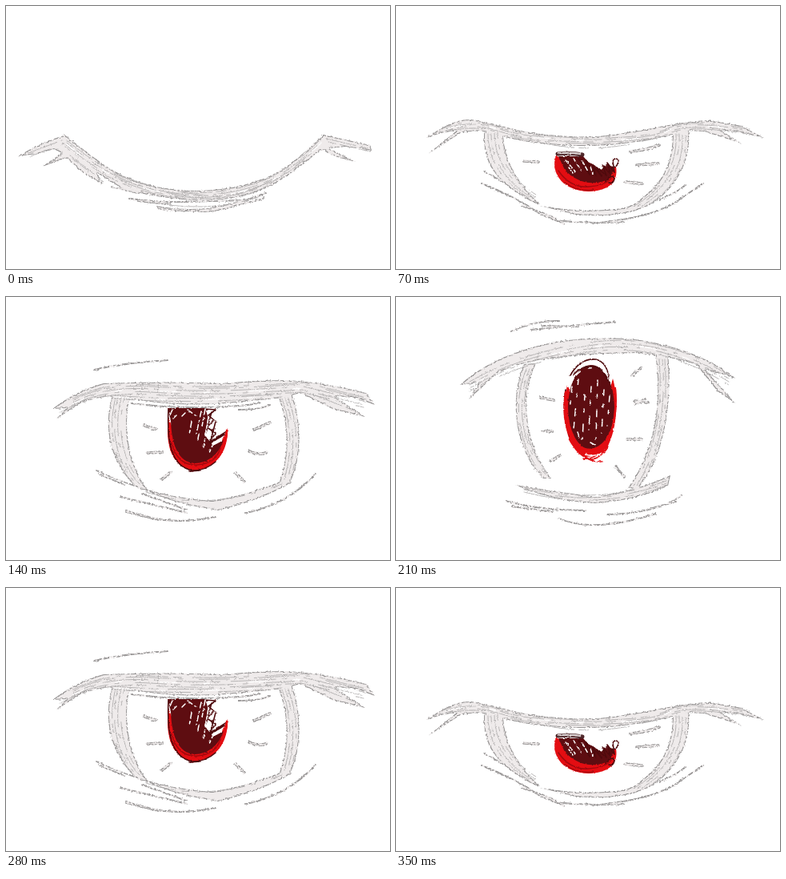
Recreate the animation shown at these times as an HTML page without scripts. Size 480 px wide and 329 px high, loop 0.42 s.

```html
<!DOCTYPE html>
<html lang="en">
<head>
<meta charset="utf-8">
<title>Blinking eye</title>
<style>
html, body { margin: 0; width: 100%; height: 100%; overflow: hidden; background: #fff; }
svg { display: block; width: 480px; height: 329px; }
path, ellipse { stroke-linecap: round; stroke-linejoin: round; }

.pose { visibility: hidden; animation: 420ms step-end infinite; }
.shut { animation-name: shut; }
.low { animation-name: low; }
.half { animation-name: half; }
.wide { animation-name: wide; }
@keyframes shut { 0% { visibility: visible } 16.66%, 100% { visibility: hidden } }
@keyframes low { 0%, 33.33% { visibility: hidden } 16.66%, 83.33%, 100% { visibility: visible } }
@keyframes half { 0%, 50%, 83.33%, 100% { visibility: hidden } 33.33%, 66.66% { visibility: visible } }
@keyframes wide { 0%, 66.66%, 100% { visibility: hidden } 50% { visibility: visible } }

/* pencil bands, thin strokes, streaks */
.band { fill: #efebeb; filter: url(#pencil); }
.band .line { fill: none; stroke: #efebeb; stroke-width: 1.9; }
.band .mark { fill: none; stroke: #efebeb; stroke-width: 3.6; }
.streak { fill: none; stroke: #b1afaf; stroke-width: .9; stroke-dasharray: 38 6 11 14 56 9 5 21; filter: url(#rough); }
.b { stroke-dashoffset: 29; }
.c { stroke-dashoffset: 77; }
.d { stroke-dashoffset: 118; }
.w { stroke: #fff; stroke-width: 1.2; stroke-dasharray: 21 34 9 47; }

/* iris */
.iris { filter: url(#wobble); fill: none; }
.dark { fill: #5e0d11; }
.ink { stroke: #4e090c; stroke-width: 1.6; }
.red { fill: #e30d12; }
.rim { stroke: #e30d12; stroke-width: 2.5; }
.deep { stroke: #a3080d; stroke-width: 1.5; }
.gap { stroke: #fff; stroke-width: 1.5; }
</style>
</head>
<body>
<svg viewBox="0 0 480 329">
<defs>
  <filter id="pencil" filterUnits="userSpaceOnUse" x="0" y="0" width="480" height="329" color-interpolation-filters="sRGB">
    <feTurbulence type="fractalNoise" baseFrequency=".35" numOctaves="2" seed="4" result="noise"/>
    <feDisplacementMap in="SourceGraphic" in2="noise" scale="3" xChannelSelector="R" yChannelSelector="G" result="body"/>
    <feMorphology in="body" operator="erode" radius="1" result="core"/>
    <feComposite in="body" in2="core" operator="out" result="edge"/>
    <feFlood flood-color="#999797"/>
    <feComposite in2="edge" operator="in" result="outline"/>
    <feColorMatrix in="noise" values="0 0 0 0 0  0 0 0 0 0  0 0 0 0 0  0 0 8 0 -3"/>
    <feComposite in="outline" operator="in" in2="grain" result="unused"/>
    <feColorMatrix in="noise" values="0 0 0 0 0  0 0 0 0 0  0 0 0 0 0  0 0 8 0 -3" result="grain"/>
    <feComposite in="outline" in2="grain" operator="in" result="broken"/>
    <feMerge><feMergeNode in="body"/><feMergeNode in="broken"/></feMerge>
  </filter>
  <filter id="rough" filterUnits="userSpaceOnUse" x="0" y="0" width="480" height="329" color-interpolation-filters="sRGB">
    <feTurbulence type="fractalNoise" baseFrequency=".4" numOctaves="2" seed="9"/>
    <feDisplacementMap in="SourceGraphic" scale="3" xChannelSelector="R" yChannelSelector="G"/>
  </filter>
  <filter id="wobble" filterUnits="userSpaceOnUse" x="0" y="0" width="480" height="329" color-interpolation-filters="sRGB">
    <feTurbulence type="fractalNoise" baseFrequency=".3" numOctaves="2" seed="2"/>
    <feDisplacementMap in="SourceGraphic" scale="2.5" xChannelSelector="R" yChannelSelector="G"/>
  </filter>
</defs>

<g class="pose shut">
  <g class="band">
    <path d="M73 161C93 176 116 196 138 208C170 225 205 231 240 231C285 230 322 220 349 202C370 187 384 173 397 161L408 167C384 188 362 207 333 224C304 239 272 243 240 243C205 242 175 236 146 229C118 212 96 195 74 188L62 172Z"/>
    <path d="M73 162C50 168 32 178 15 188L38 185L60 179L70 184L45 201L76 190L95 208L120 223L112 204Z"/>
    <path d="M397 161L428 168L455 174L458 181L425 176L403 178L437 195L414 189L397 181L385 178Z"/>
    <path d="M188 250Q218 256 252 253Q286 247 298 241L300 246Q276 256 250 258Q216 257 190 255Z"/>
    <path class="line" d="M155 241Q190 246 222 245T300 243L325 234M262 251Q300 249 323 240M132 226L165 234M165 244L205 248"/>
  </g>
  <g class="streak">
    <path id="s1" d="M76 168C120 204 158 228 238 234C320 232 358 202 394 166"/>
    <use href="#s1" y="3" class="b"/><use href="#s1" x="-1" y="6" class="c"/><use href="#s1" x="-2" y="8" class="d"/>
    <use href="#s1" y="5" class="w"/>
    <path id="s2" d="M28 184L70 168M80 187L118 216M400 166L452 178"/>
    <use href="#s2" x="3" y="4" class="b"/>
    <path id="s2b" d="M135 214Q180 232 240 240T340 215"/>
    <use href="#s2b" y="-4" class="c"/>
    <path d="M165 242Q205 252 245 251T318 238" class="b"/>
  </g>
</g>

<g class="pose low">
  <g class="band">
    <path d="M38 165C58 151 76 141 93 142C126 146 150 158 190 161C226 165 262 164 290 158C330 152 362 143 393 143L432 150L460 165L430 158L404 154L432 172L386 157L366 156C340 163 310 169 285 172C240 178 190 174 160 169C132 164 118 158 104 156L82 158L40 185L77 155Q60 157 38 165Z"/>
    <path d="M112 155L134 158C134 190 151 222 180 248L172 246C136 226 108 206 110 160Z"/>
    <path d="M346 157L366 156C369 190 354 224 322 246C296 262 260 264 225 261L180 250Q230 258 262 255Q290 254 300 246C334 222 346 198 346 157Z"/>
    <path class="line" d="M110 207Q140 224 172 240M107 222Q150 239 180 260L210 272M157 250Q186 259 200 266M198 268Q240 273 285 270M255 271Q330 263 357 240L384 222M330 242Q350 234 362 224"/>
    <path class="mark" d="M161 194L178 195M293 182Q315 180 329 174M301 199L328 197M287 220L307 222"/>
  </g>
  <g class="streak">
    <path id="s3" d="M62 153Q96 142 130 154T240 167T340 155T442 156"/>
    <use href="#s3" y="3" class="b"/><use href="#s3" y="5" class="c"/><use href="#s3" y="-2" class="d"/>
    <use href="#s3" y="1" class="w"/>
    <path id="s4" d="M115 160C115 190 130 218 166 240"/>
    <use href="#s4" x="4" class="b"/><use href="#s4" x="8" y="-1" class="c"/><use href="#s4" x="12" y="-2" class="d"/>
    <path id="s5" d="M350 160C352 200 332 230 298 250"/>
    <use href="#s5" x="4" class="b"/><use href="#s5" x="8" y="1" class="c"/><use href="#s5" x="12" y="2" class="d"/>
    <path d="M185 172Q240 183 292 173"/>
  </g>
  <g class="iris">
    <path class="red" d="M200 187C194 204 203 220 218 227C237 236 262 232 271 221Q277 213 275 201L262 208L230 205Z"/>
    <path class="dark" d="M203 188L234 188L240 195L248 199L255 205L263 199L272 201Q272 213 260 219C242 225 224 219 211 205Z"/>
    <path class="ink" d="M228 190L242 211L237 192L250 212L246 199L257 213L251 202L263 212L258 199L268 210L264 196L273 208L271 194Q274 188 278 193Q278 201 270 203M262 220Q270 209 273 216Q272 223 266 221"/>
    <path class="gap" d="M212 193L224 207M222 191L231 205M233 194L240 207M243 201L246 210M216 202L221 209" stroke-dasharray="5 3"/>
    <path class="deep" d="M203 206Q218 228 241 226T269 215M211 221Q229 233 247 230"/>
    <path d="M202 185Q218 183 233 186" stroke="#4d2629" stroke-width="5"/>
    <path d="M203 184Q218 183 231 185" stroke="#d6cccc" stroke-width="2.5"/>
  </g>
</g>

<g class="pose half">
  <g class="band">
    <path d="M122 108Q200 105 270 108Q320 104 352 104Q388 106 425 114L450 120L461 135L438 126L410 124L449 150L408 140L368 120L346 126Q300 131 260 134Q218 136 180 131Q150 126 126 124L96 131L62 153L76 139L58 140Q88 117 122 108Z"/>
    <path d="M133 123L155 124C146 162 152 208 178 243L164 239C132 210 120 166 133 123Z"/>
    <path d="M340 124L357 121C370 156 370 200 356 230L342 231C354 196 354 160 340 124Z"/>
    <path d="M165 237Q208 252 258 255Q310 246 352 227L357 232Q320 254 265 267L250 264Q206 258 165 237Z"/>
    <path class="line" d="M110 91Q150 82 202 79M113 217Q140 230 170 239M115 221L148 235M143 250Q180 259 226 270M170 246L225 266M150 267Q200 288 262 275M150 269Q175 273 190 279M300 270Q352 260 387 221M290 141Q318 141 330 135M157 133Q200 139 250 138T318 132"/>
    <path class="mark" d="M173 161L187 165M177 195L195 194M195 228L206 219M310 166L330 157M304 193Q315 198 325 195M287 220L298 231"/>
  </g>
  <g class="streak">
    <path id="s6" d="M84 129Q122 108 182 112T300 113T372 109L450 128"/>
    <use href="#s6" y="3" class="b"/><use href="#s6" x="-2" y="7" class="c"/><use href="#s6" x="-3" y="10" class="d"/><use href="#s6" y="-2" class="c"/>
    <use href="#s6" y="5" class="w"/>
    <path id="s6b" d="M135 123Q230 131 345 121"/>
    <use href="#s6b" y="4" class="b"/><use href="#s6b" y="2" class="w"/>
    <path d="M68 144L112 121M384 122L440 144"/>
    <path id="s7" d="M137 126C127 164 134 208 160 234"/>
    <use href="#s7" x="3" class="b"/><use href="#s7" x="7" class="c"/><use href="#s7" x="11" class="d"/>
    <path id="s8" d="M345 127Q363 176 348 228"/>
    <use href="#s8" x="4" class="b"/><use href="#s8" x="8" class="c"/>
    <path d="M175 244Q250 270 345 234"/>
  </g>
  <g class="iris">
    <path class="red" d="M203 150C199 184 206 212 234 217C262 215 278 194 277 164L268 184L220 196Z"/>
    <path class="dark" d="M202 139L249 139L253 152L248 172L259 186L272 179C266 197 252 208 236 208C216 207 207 186 206 155Z"/>
    <path class="ink" d="M248 140L262 141L253 148L260 154L251 163L262 170L254 182L276 168M257 144L250 170M262 156L255 183L273 172M203 141C201 180 206 212 233 217Q250 217 262 206M229 218L243 217"/>
    <path class="gap" d="M208 141L204 150M213 148L209 152M227 141L238 149M244 143L238 171M249 140L245 162M253 150L247 188M232 156L229 172M260 181L254 195M220 149L224 145M241 172L239 182" stroke-dasharray="7 4 3 3"/>
    <path class="rim" d="M276 167C276 186 264 204 247 211"/>
    <path class="deep" d="M207 182Q214 211 238 210T268 189"/>
  </g>
</g>

<g class="pose wide">
  <g class="band">
    <path d="M80 110C104 88 140 68 200 56Q250 49 300 53C346 60 390 74 425 102L398 94L386 90L424 133L402 118L375 84Q340 74 300 70Q250 70 200 76Q160 80 128 94L91 128L104 107Z"/>
    <path d="M160 84L175 83C154 128 162 184 194 227L184 227C150 194 140 130 160 84Z"/>
    <path d="M324 72L340 70C346 132 336 200 302 240L290 239C322 194 334 134 324 72Z"/>
    <path d="M149 235Q200 244 250 250Q302 242 343 223L340 236Q304 254 250 258Q196 256 149 235Z"/>
    <path class="line" d="M144 43Q172 29 204 30M168 41Q220 36 274 31M182 36L228 37M137 255Q180 267 237 267M145 262L196 269M204 277Q246 296 325 271M264 272Q330 270 357 248M310 267L350 256"/>
    <path class="mark" d="M181 126L197 129M184 168L196 168M194 205L205 198M295 98L306 89M298 130L315 132M299 134L311 128M289 178L307 178M275 212L285 225"/>
  </g>
  <g class="streak">
    <path id="s9" d="M92 106Q150 71 240 57T416 98"/>
    <use href="#s9" y="4" class="b"/><use href="#s9" y="8" class="c"/><use href="#s9" y="12" class="d"/>
    <use href="#s9" y="6" class="w"/>
    <path id="s10" d="M163 90C144 134 154 190 184 223"/>
    <use href="#s10" x="4" class="b"/><use href="#s10" x="7" class="c"/>
    <path id="s11" d="M329 78Q337 172 297 236"/>
    <use href="#s11" x="4" class="b"/><use href="#s11" x="7" class="c"/>
    <path id="s12" d="M160 238Q250 262 338 230"/>
    <use href="#s12" y="3" class="b"/><use href="#s12" y="6" class="c"/>
    <path d="M384 90L418 126"/>
  </g>
  <g class="iris">
    <path class="red" d="M214 110C205 152 214 188 234 200Q258 200 266 184C278 158 277 122 271 102L250 180Z"/>
    <ellipse class="dark" cx="244" cy="138" rx="29" ry="53"/>
    <path class="ink" d="M218 98Q230 76 250 78Q264 82 266 101M222 97Q238 80 257 91L267 108M212 116Q207 147 217 174"/>
    <path class="gap" d="M225 98Q241 81 262 95M220 112L217 142M228 103L222 165M236 122L233 178M244 112L241 166M252 104L250 178M260 116L257 170M267 124L264 161M227 169L231 184M243 182L252 187" stroke-dasharray="7 11 4 15 9 8"/>
    <path class="rim" d="M212 120C206 162 220 191 243 191Q260 189 268 169M274 114Q277 145 268 172M217 178Q226 196 246 196T264 183"/>
    <path d="M228 193Q240 207 258 206M234 202Q249 204 263 186M233 195Q245 214 265 188" stroke="#e30d12" stroke-width="1.5"/>
    <path class="gap" d="M237 197Q247 200 256 196"/>
  </g>
</g>
</svg>
</body>
</html>
```
